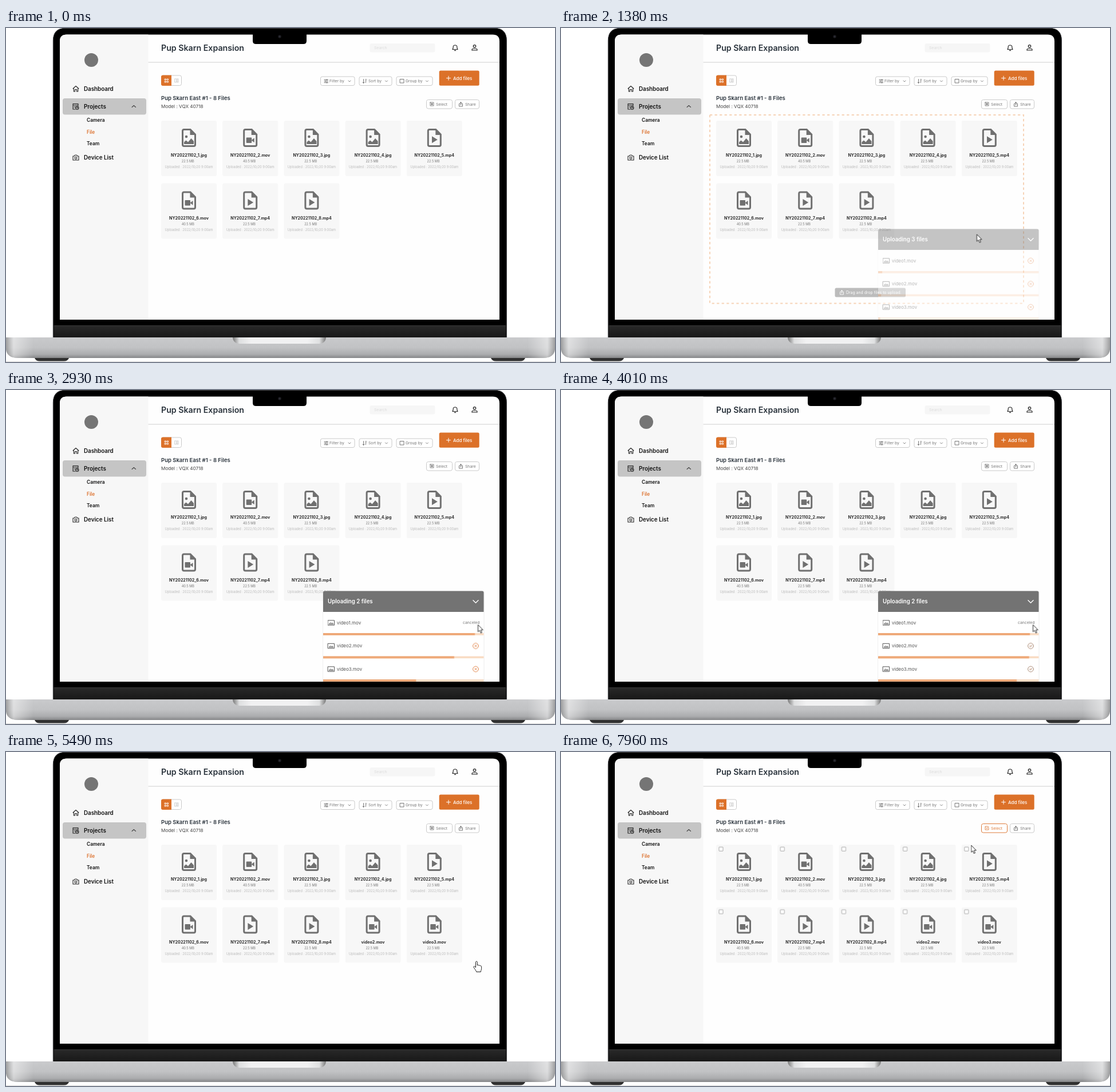
Recreate the animation shown at these times as an HTML page. Size 959 by 584 pixels, loop 8000 ms.

```html
<!DOCTYPE html>
<html lang="en">
<head>
<meta charset="utf-8">
<title>File upload demo</title>
<style>
html, body { margin: 0; width: 100%; height: 100%; overflow: hidden; background: #fff; }
svg { display: block; width: 959px; height: 584px; font-family: Inter, "Open Sans", sans-serif; }
.line { fill: none; stroke-linecap: round; stroke-linejoin: round; }
.box { fill: #fff; stroke: #c4c4c4; stroke-width: .9; }
.nav { font-size: 9.8px; font-weight: 600; fill: #111; }
.sub { font-size: 8.4px; font-weight: 600; fill: #111; }
.btn { font-size: 6.8px; fill: #777; }
.name { font-size: 7.1px; font-weight: 700; fill: #2d2d2d; text-anchor: middle; }
.size { font-size: 5.6px; fill: #777; text-anchor: middle; }
.date { font-size: 5.7px; fill: #bababa; text-anchor: middle; }
.head { font-size: 9.7px; font-weight: 600; fill: #fff; }
.row { font-size: 8px; fill: #555; }

/* one shared 8 s clock */
.a { animation: 8s linear infinite both; }
.drop { animation-name: drop; }
.toast { animation-name: toast; }
.panel { animation-name: panel; }
.before { animation-name: before; }
.after { animation-name: after; }
.three { animation-name: three; }
.two { animation-name: two; }
.cancelled { animation-name: cancelled; }
.busy { animation-name: busy; }
.done { animation-name: done; }
.idle { animation-name: idle; }
.active { animation-name: active; }
.ticks { animation-name: ticks; }
.move { animation-name: move; animation-timing-function: ease-in-out; }
.arrow { animation-name: arrow; }
.hand { animation-name: hand; }
.bar { transform-box: fill-box; transform-origin: 0 0; animation-timing-function: ease-out; }
.bar1 { animation-name: bar1; }
.bar2 { animation-name: bar2; }
.bar3 { animation-name: bar3; }

@keyframes drop { 0%, 5.81% { opacity: 0 } 7.75%, 15.31% { opacity: 1 } 19%, 100% { opacity: 0 } }
@keyframes toast { 0%, 10.56% { opacity: 0 } 13.2%, 15.31% { opacity: 1 } 19%, 100% { opacity: 0 } }
@keyframes panel { 0%, 15.31% { opacity: 0 } 20%, 65.69% { opacity: 1 } 68.62%, 100% { opacity: 0 } }
@keyframes three { 0%, 25.62% { opacity: 1 } 35.62%, 100% { opacity: 0 } }
@keyframes two { 0%, 25.62% { opacity: 0 } 35.62%, 55.06% { opacity: 1 } 59%, 100% { opacity: 0 } }
@keyframes cancelled { 0%, 25.62% { opacity: 0 } 35.62%, 100% { opacity: 1 } }
@keyframes busy { 0%, 46.31% { opacity: 1 } 54.12%, 100% { opacity: 0 } }
@keyframes done { 0%, 46.31% { opacity: 0 } 54.12%, 100% { opacity: 1 } }
@keyframes before { 0%, 55.06% { opacity: 1 } 59%, 100% { opacity: 0 } }
@keyframes after { 0%, 55.06% { opacity: 0 } 59%, 100% { opacity: 1 } }
@keyframes idle { 0%, 77.5% { opacity: 1 } 80%, 100% { opacity: 0 } }
@keyframes active { 0%, 77.5% { opacity: 0 } 80%, 100% { opacity: 1 } }
@keyframes ticks { 0%, 84.06% { opacity: 0 } 86.87%, 100% { opacity: 1 } }
@keyframes bar1 { 0%, 15.31% { transform: scaleX(0) } 24.8%, 25.62% { transform: scaleX(.082) } 36.6%, 100% { transform: scaleX(.945) } }
@keyframes bar2 { 0%, 15.31% { transform: scaleX(0) } 24.8%, 25.62% { transform: scaleX(.06) } 36.6%, 46.31% { transform: scaleX(.816) } 54.12%, 100% { transform: scaleX(1) } }
@keyframes bar3 { 0%, 15.31% { transform: scaleX(0) } 24.8%, 25.62% { transform: scaleX(.04) } 36.6%, 46.31% { transform: scaleX(.579) } 54.12%, 100% { transform: scaleX(1) } }
@keyframes move {
  0%, .87% { transform: translate(796px, 482px) }
  2.6%, 15.31% { transform: translate(715.5px, 356.5px) }
  24.8%, 25.62% { transform: translate(841px, 405px) }
  35.62%, 59.94% { transform: translate(824.5px, 410.5px) }
  64.75%, 72.44% { transform: translate(822px, 366px) }
  80%, 84.06% { transform: translate(764px, 138px) }
  86.87%, 93.81% { transform: translate(757px, 133px) }
  99.5%, 100% { transform: translate(716.5px, 163px) }
}
@keyframes arrow { 0%, .86% { opacity: 0 } .87%, 61% { opacity: 1 } 64.75%, 84.06% { opacity: 0 } 86.87%, 100% { opacity: 1 } }
@keyframes hand { 0%, 61% { opacity: 0 } 64.75%, 84.06% { opacity: 1 } 86.87%, 100% { opacity: 0 } }
</style>
</head>
<body>
<svg viewBox="0 0 959 584">
  <defs>
    <linearGradient id="metal" x2="0" y2="1">
      <stop offset="0" stop-color="#c9cacc"/><stop offset=".5" stop-color="#c1c2c4"/>
      <stop offset=".82" stop-color="#abacae"/><stop offset="1" stop-color="#858688"/>
    </linearGradient>
    <linearGradient id="ends">
      <stop offset="0" stop-color="#777" stop-opacity=".5"/><stop offset=".014" stop-color="#fff" stop-opacity=".45"/>
      <stop offset=".05" stop-color="#fff" stop-opacity="0"/><stop offset=".95" stop-color="#fff" stop-opacity="0"/>
      <stop offset=".986" stop-color="#fff" stop-opacity=".45"/><stop offset="1" stop-color="#777" stop-opacity=".5"/>
    </linearGradient>
    <linearGradient id="lip">
      <stop offset="0" stop-color="#777"/><stop offset=".07" stop-color="#dedfe0"/><stop offset=".2" stop-color="#f1f1f2"/>
      <stop offset=".8" stop-color="#f1f1f2"/><stop offset=".93" stop-color="#dedfe0"/><stop offset="1" stop-color="#777"/>
    </linearGradient>
    <linearGradient id="chin" x2="0" y2="1"><stop offset="0" stop-color="#292929"/><stop offset="1" stop-color="#181818"/></linearGradient>
    <clipPath id="screen"><path d="M94 510V23Q94 11.500 106 11.500H850Q862 11.500 862 23V510Z"/></clipPath>
    <path id="base" d="M0 541H959V562Q957 577 938 577H21Q2 577 0 562Z"/>
    <g id="doc">
      <path d="M4.500 1.500H15.500L24 10V28Q24 30.500 21.500 30.500H4.500Q2 30.500 2 28V4Q2 1.500 4.500 1.500Z" fill="none" stroke="#707070" stroke-width="3"/>
      <path d="M15 1V11H25Z" fill="#707070"/>
    </g>
    <g id="jpg" fill="#707070"><use href="#doc"/><circle cx="8.500" cy="14" r="2.300"/><path d="M4.500 27V23.500L8 20.500L11.500 23.500L17 17L21.500 22V27Z"/></g>
    <g id="mov" fill="#707070"><use href="#doc"/><rect x="6" y="15.500" width="9.500" height="9.500" rx="1"/><path d="M15 20.200L20 16.300V24.200Z"/></g>
    <g id="mp4" fill="#707070"><use href="#doc"/><path d="M8.700 13.300L18.500 19.300L8.700 25.300Z"/></g>
    <path id="down" class="line" d="M-2 -1L0 1L2 -1" stroke="#777" stroke-width=".9"/>
    <path id="tray" class="line" d="M-1.500 -1H-3V3.500H3V-1H1.500M0 1V-4M-1.700 -2.400L0 -4L1.700 -2.400"/>
  </defs>

  <!-- laptop -->
  <path d="M82.300 541V22Q82.300 .3 104 .3H853Q874.500 .3 874.500 22V541Z" stroke="#48494c"/>
  <rect x="83.500" y="520" width="790" height="21" fill="url(#chin)"/>
  <path d="M84 520.400H873" stroke="#3b3b3b" stroke-width=".8"/>
  <path d="M50 577H110Q108 582.500 101 582.500H59Q52 582.500 50 577ZM847 577H907Q905 582.500 898 582.500H856Q849 582.500 847 577Z" fill="#303030"/>
  <use href="#base" fill="url(#metal)"/>
  <use href="#base" fill="url(#ends)"/>
  <path d="M396 541H559Q558 552 546 552H409Q397 552 396 541Z" fill="url(#lip)"/>
  <path d="M0 583.500H959" stroke="#d5d5d5"/>

  <g clip-path="url(#screen)">
    <rect x="94" y="11" width="768" height="499" fill="#fefefe"/>
    <rect x="94" y="11" width="154.500" height="499" fill="#f7f7f7"/>
    <path d="M248.500 60H862" stroke="#cfcfcf"/>

    <!-- sidebar -->
    <circle cx="149" cy="56" r="12" fill="#757575"/>
    <rect x="99" y="123" width="146" height="28.500" rx="4" fill="#c5c5c5"/>
    <g class="line" stroke="#222" stroke-width="1.100">
      <path d="M117 106L122 101.500L127 106M118.300 105.500V111H120.500V107.500H123.500V111H125.700V105.500"/>
      <path d="M121 142H117V132.500H126V136M117 135H126M119 138H121.500"/><circle cx="124.300" cy="139.700" r="2.600"/><path d="M124.300 138.500V139.800H125.300"/>
      <path d="M117 224H119.300L120.300 222.300H123.700L124.700 224H127V231H117Z"/><circle cx="122" cy="227.200" r="1.900"/>
      <path d="M220 138.500L223.300 135.500L226.600 138.500" stroke="#444"/>
    </g>
    <g class="nav"><text x="136" y="110">Dashboard</text><text x="136" y="140.500">Projects</text><text x="136" y="230">Device List</text></g>
    <g class="sub"><text x="141" y="164.300">Camera</text><text x="141" y="184.700" style="fill:#dd7330">File</text><text x="141" y="205">Team</text></g>

    <!-- header -->
    <text x="271" y="39.500" font-size="14.200" font-weight="600" fill="#2a333c">Pup Skarn Expansion</text>
    <rect x="635.500" y="27" width="114" height="15.500" rx="3" fill="#f6f6f6"/>
    <text x="643" y="37.300" class="btn" style="fill:#dcdcdc">Search</text>
    <g class="line" stroke="#222" stroke-width="1.200">
      <path d="M780 37.500Q781.200 36 781.200 33Q781.200 30 784.500 30Q787.800 30 787.800 33Q787.800 36 789 37.500ZM783.300 39.300H785.700"/>
      <circle cx="818.500" cy="31.800" r="2.200"/><path d="M814 39V38Q814 36 816.500 36H820.500Q823 36 823 38V39Z"/>
    </g>

    <!-- toolbar -->
    <rect x="271.500" y="83" width="35" height="17.500" rx="3" class="box"/>
    <path d="M289 82.500H274Q271 82.500 271 85.500V98Q271 101 274 101H289Z" fill="#dc7129"/>
    <path class="line" d="M277.500 89h2v2h-2zM281.500 89h2v2h-2zM277.500 93h2v2h-2zM281.500 93h2v2h-2z" stroke="#fff" stroke-width=".9"/>
    <path class="line" d="M295 88.800H301V95H295ZM297 90.500H299.500M297 92H299.500M297 93.500H299.500" stroke="#c4c4c4" stroke-width=".8"/>
    <g class="box">
      <rect x="549.500" y="85" width="59.500" height="15.500" rx="3"/><rect x="617" y="85" width="57" height="15.500" rx="3"/>
      <rect x="682" y="85" width="63" height="15.500" rx="3"/><rect x="784.500" y="125.500" width="42" height="15.500" rx="3"/>
    </g>
    <g class="line" stroke="#666" stroke-width=".9">
      <path d="M556 90.500H562.500M556 93H562.500M556 95.500H562.500M560.500 89.700V91.300M558 92.200V93.800M560.500 94.700V96.300"/>
      <path d="M624.500 89.500V96.500M623 95L624.500 96.500L626 95M627.500 90H630M627.500 92.500H629.500M627.500 95H629"/>
      <rect x="688.500" y="89.500" width="6.500" height="6.500"/>
    </g>
    <use href="#tray" x="794.500" y="133.500" stroke="#666" stroke-width=".9"/>
    <use href="#down" x="600" y="93"/><use href="#down" x="664.500" y="93"/><use href="#down" x="735.500" y="93"/>
    <g class="btn">
      <text x="565" y="95.300">Filter by</text><text x="633" y="95.300">Sort by</text><text x="698" y="95.300">Group by</text><text x="802" y="135.800">Share</text>
    </g>
    <rect x="756.700" y="74.500" width="70" height="26.300" rx="2.500" fill="#dc7129"/>
    <path class="line" d="M769.500 87.700H776.500M773 84.200V91.200" stroke="#fff"/>
    <text x="781" y="90.600" font-size="7.900" font-weight="500" fill="#fff">Add files</text>
    <g class="a idle">
      <rect x="734.500" y="125.500" width="45" height="15.500" rx="3" class="box"/>
      <path class="line" d="M741 130H747V136H741Z" stroke="#777" stroke-dasharray="1.500 1"/><rect x="742.500" y="131.500" width="3" height="3" fill="#777"/>
      <text x="751" y="135.800" class="btn">Select</text>
    </g>
    <g class="a active">
      <rect x="734.500" y="125.500" width="45" height="15.500" rx="3" fill="#fff" stroke="#dd7b3a"/>
      <path class="line" d="M747 132.500V136H741V130H745.500M742.700 132.500L744 134L747 130.300" stroke="#dd7b3a" stroke-width=".9"/>
      <text x="751" y="135.800" class="btn" style="fill:#dd7b3a">Select</text>
    </g>
    <text x="271" y="126.200" font-size="9.500" font-weight="600" fill="#2a333c">Pup Skarn East #1 - 8 Files</text>
    <text x="271" y="139.500" font-size="8.200" fill="#444">Model : VQX 40718</text>

    <g id="cards"></g>

    <rect class="a drop" x="260" y="152" width="548" height="329.500" fill="none" stroke="#efa569" stroke-width="2" stroke-dasharray="4.270"/>
    <g class="a toast">
      <rect x="478.500" y="454.500" width="123.500" height="16" rx="2.500" fill="#737373"/>
      <use href="#tray" x="490.500" y="462.500" stroke="#fff" stroke-width=".9"/>
      <text x="498" y="465" font-size="6.900" fill="#fff">Drag and drop files to upload.</text>
    </g>

    <!-- upload panel -->
    <g class="a panel">
      <rect x="553.200" y="351" width="282.300" height="162" rx="3" fill="#000" opacity=".07"/>
      <rect x="554" y="380" width="280.500" height="132" fill="#fff"/>
      <path d="M554 388V354.500Q554 351.500 557 351.500H831.500Q834.500 351.500 834.500 354.500V388Z" fill="#737373"/>
      <g class="head">
        <text class="a three" x="562" y="373">Uploading 3 files</text>
        <text class="a two" x="562" y="373">Uploading 2 files</text>
        <text class="a after" x="562" y="373">2 files uploaded</text>
      </g>
      <g class="line" stroke="#fff" stroke-width="1.400">
        <path class="a before" d="M816 367.700L820.500 372.200L825 367.700"/>
        <path class="a after" d="M792 367.700L796.500 372.200L801 367.700M817.200 366.500L824.200 373.500M824.200 366.500L817.200 373.500"/>
      </g>
      <g id="rows"></g>
    </g>

    <!-- pointer -->
    <g class="a move" fill="#fff" stroke="#222" stroke-width="1" stroke-linejoin="round">
      <path class="a arrow" d="M0 0V12.300L2.800 9.800L4.800 14.400L6.900 13.500L5 9H8.800Z"/>
      <path class="a hand" d="M-1.500 1.300C-1.500 -.4 1.300 -.4 1.300 1.300V7C2 6 4 6.200 4.200 7.500C5 6.600 6.700 7 6.900 8.200C8 7.600 8.600 8.500 8.600 9.600V12.500C8.600 15 7.300 16 7.300 18.500H-.3C-.5 16.500 -2 15.500 -3 13.500L-5 10.500C-5.700 9 -4 8 -2.800 9.200L-1.500 10.800Z"/>
    </g>
  </g>
  <path d="M431 11H525V22.500Q525 28 519.500 28H436.500Q431 28 431 22.500Z"/>
  <circle cx="478" cy="15" r="2.800" fill="#1b1b1f"/><circle cx="478" cy="15" r="1.200" fill="#30303a"/>
</svg>
<script>
const types = ['jpg', 'mov', 'jpg', 'jpg', 'mp4', 'mov', 'mp4', 'mp4', 'mov', 'mov'];

function card(type, i) {
  const added = i > 7;
  const name = added ? `video${i - 6}.mov` : `NY20221102_${i + 1}.${type}`;
  const size = type === 'mov' && !added ? '40.5 MB' : '22.5 MB';
  const x = 271 + i % 5 * 107.2, y = i < 5 ? 162 : 271.6;
  return `<g transform="translate(${x} ${y})"><g${added ? ' class="a after"' : ''}>
    <rect width="97" height="97" rx="3" fill="#f7f7f7"/>
    <use href="#${type}" x="35.500" y="14"/>
    <text class="name" x="48.500" y="63.300">${name}</text>
    <text class="size" x="46.800" y="73">${size}</text>
    <text class="date" x="48.500" y="83">Uploaded : 2022/10/20 9:00am</text></g>
    <rect class="a ticks" x="5" y="4.200" width="7" height="7" rx=".5" fill="#fff" stroke="#a0a0a0" stroke-width=".9"/></g>`;
}

function row(n) {
  const cross = `<g class="a ${n === 1 ? 'three' : 'busy'} line" stroke="#e28a52" stroke-width="1">
    <circle cx="820.500" cy="407" r="4.900"/><path d="M818.600 405.100L822.400 408.900M822.400 405.100L818.600 408.900"/></g>`;
  const end = n === 1
    ? '<text class="a cancelled btn" x="798" y="409">canceled</text>'
    : `<g class="a done line" stroke="#666" stroke-width="1">
       <circle cx="820.500" cy="407" r="4.900"/><path d="M818.300 407.200L820 408.800L822.900 405.400"/></g>`;
  return `<g transform="translate(0 ${(n - 1) * 40.5})">
    <path class="line" d="M562.500 402.800H573.500V411.200H562.500ZM564.500 409L566.700 406.700L568.300 408.300L569.700 407L571.500 409Z" stroke="#555" stroke-width="1"/>
    <text class="row" x="578" y="409.800">video${n}.mov</text>${cross}${end}
    <rect x="554" y="425" width="280.500" height="3.800" fill="#f9dcc4"/>
    <rect class="a bar bar${n}" x="554" y="425" width="280.500" height="3.800" fill="#eea877"/></g>`;
}

document.getElementById('cards').innerHTML = types.map(card).join('');
document.getElementById('rows').innerHTML = [1, 2, 3].map(row).join('');
</script>
</body>
</html>
```
